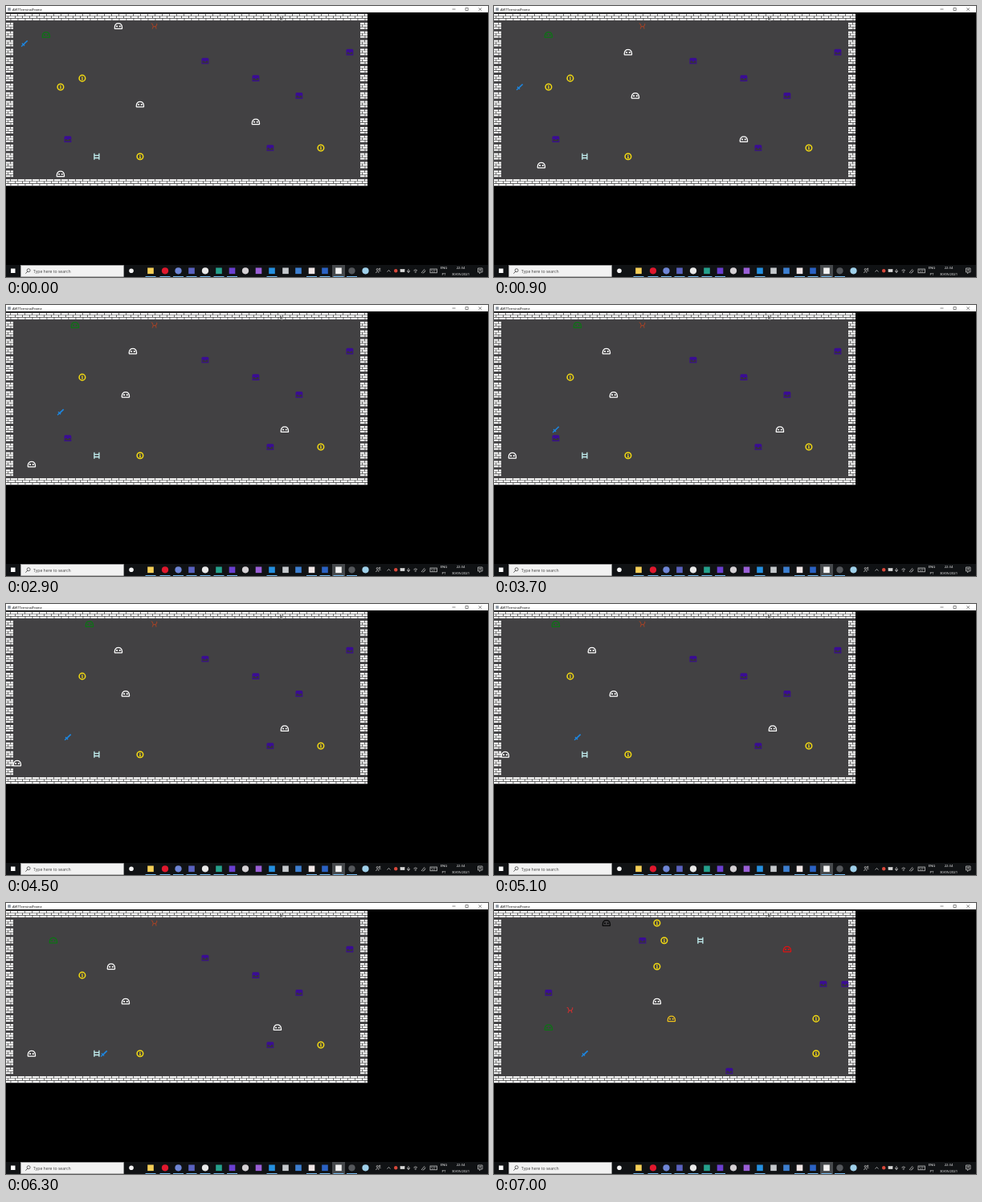
Animation, 600 px wide and 338 px high, one loop 8 s. Source, as an HTML page:

```html
<!DOCTYPE html>
<html lang="en">
<head>
<meta charset="utf-8">
<title>Dungeon</title>
<style>
  html, body { margin: 0; width: 100%; height: 100%; overflow: hidden; background: #000; }
  svg { display: block; width: 600px; height: 338px; }
  .ui { font-family: "Open Sans", "Noto Sans", sans-serif; }
  .mono { font: italic 9px "DejaVu Sans Mono", "Noto Sans Mono", monospace; letter-spacing: 3.6px; white-space: pre; }
</style>
</head>
<body>
<svg viewBox="0 0 600 338" xmlns="http://www.w3.org/2000/svg">
  <defs>
    <pattern id="bricks" width="9" height="10.85" y="9" patternUnits="userSpaceOnUse">
      <rect width="9" height="10.85" fill="#424143"/>
      <rect y=".9" width="9" height="8" fill="#2c2c2c"/>
      <path fill="#fff" d="M0 .9H5V3.1H0zM5.7 .9H9V3.1H5.7zM0 3.8H2.2V6H0zM2.9 3.8H9V6H2.9zM0 6.7H5.6V8.9H0zM6.3 6.7H9V8.9H6.3z"/>
    </pattern>
    <g id="blob">
      <path d="M-4.3 3.2Q-4.8 3.2-4.6 1.6C-4.2-5 4.2-5 4.6 1.6Q4.8 3.2 4.3 3.2Z" fill="none" stroke="currentColor" stroke-width="1.25" stroke-linejoin="round"/>
      <path d="M-2.8-.6H-.9V1.1H-2.8zM.9-.6H2.8V1.1H.9z" fill="currentColor"/>
    </g>
    <g id="imp" fill="none" stroke="currentColor" stroke-width="1.1">
      <path d="M-4.2-3.4L-2.6-2.4L-1.6 .6L-2.8 3.6M-1.6 .6H1.4L2.2 3.6M1.4 .6L2.8-1.4V-3.4"/>
    </g>
    <g id="sword" fill="none" stroke="currentColor">
      <path d="M3.8-3.5L-1.4 1.5" stroke-width="1.7"/>
      <path d="M-2.9-.2L.2 2.8M-1.4 1.5L-3.8 3.7" stroke-width="1.4"/>
    </g>
    <g id="chest">
      <path d="M-4.4-2.2Q-4.4-3.8-3-3.8H3Q4.4-3.8 4.4-2.2V3.8H-4.4Z" fill="currentColor"/>
      <path d="M-3.5-.2H-1.1V1H1.1V-.2H3.5V2.7H-3.5Z" fill="#353338"/>
    </g>
    <g id="coin">
      <circle r="3.8" fill="none" stroke="currentColor" stroke-width="1.5"/>
      <path d="M-.9-2H.6V1.3H1.1V2.1H-1V1.3H-.5V-1.2H-.9Z" fill="currentColor"/>
    </g>
    <g id="ladder" fill="none" stroke="currentColor" stroke-width="1.3">
      <path d="M-3-4V4M3-4V4M-3-1.5H3M-3 1.7H3"/>
    </g>
  </defs>

  <rect width="600" height="338"/>
  <rect y="9" width="450" height="216" fill="url(#bricks)"/>
  <rect x="9" y="18.5" width="432" height="197" fill="#424143"/>
  <g id="world"></g>
  <g id="note" visibility="hidden">
    <rect y="9" height="9.6" fill="#424143"/>
    <text class="mono" y="16.6" fill="#fff"></text>
  </g>
  <path d="M341 12.6V18L342.3 16.8L343.2 18.8L344.1 18.4L343.3 16.5H345Z" fill="#555" stroke="#ddd" stroke-width=".3"/>

  <g class="ui">
    <rect width="600" height="8" fill="#fff"/>
    <rect x="2.2" y="2.2" width="3.6" height="3.6" fill="#8c95a0"/>
    <text x="8" y="5.7" font-size="4.05" fill="#000">AWTTerminalFrame</text>
    <path d="M555.5 4H559.5M572 2.4H575.2V5.6H572ZM588.5 2.3L592 5.8M592 2.3L588.5 5.8" fill="none" stroke="#333" stroke-width=".6"/>

    <rect y="323" width="600" height="15" fill="#101214"/>
    <rect x="6" y="327.5" width="5.5" height="5.5" fill="#fff"/>
    <rect x="18.5" y="323.5" width="128" height="14.2" fill="#f2f2f2" stroke="#b4b4b4" stroke-width=".5"/>
    <path d="M26.8 331.2L24.4 333.6" stroke="#333" stroke-width=".8"/>
    <circle cx="28.1" cy="329.7" r="2" fill="none" stroke="#333" stroke-width=".7"/>
    <text x="34" y="332.5" font-size="5.1" fill="#444">Type here to search</text>
    <g id="apps"></g>
    <g fill="none" stroke="#d8d8d8" stroke-width=".7">
      <path d="M460.5 333Q462.3 328.5 464.2 333M464 331Q465.3 328.5 466.5 331"/>
      <circle cx="462.3" cy="328.6" r="1.1"/><circle cx="465.2" cy="328" r=".8"/>
      <path d="M474.5 331.5L476.5 329.5L478.5 331.5"/>
      <rect x="491" y="328.6" width="5" height="3" fill="#d8d8d8"/>
      <path d="M501 328V333M499.6 330V331.2Q501 333 502.4 331.2V330"/>
      <path d="M507.5 330Q509.8 327.6 512 330M508.6 331.4Q509.8 330.2 511 331.4M509.8 332V333"/>
      <path d="M517 333L521 328.2M518.6 333.2Q521.6 332.6 522 329.6"/>
      <rect x="528" y="328" width="8.5" height="4.8"/>
      <path d="M529.3 329.5H535.4M530.3 331.4H534.3" stroke-dasharray=".8 .5"/>
      <path d="M587.5 327H593V332H591L589.6 333.6V332H587.5ZM588.7 328.6H591.8M588.7 330.2H591.8"/>
    </g>
    <circle cx="485.2" cy="330.3" r="2.2" fill="#d9483b"/>
    <g font-size="4.2" fill="#fff" text-anchor="middle">
      <text x="545" y="328.2">ENG</text><text x="545" y="336">PT</text>
      <text x="566" y="328.2">22:34</text><text x="566" y="336">30/05/2021</text>
    </g>
  </g>
</svg>
<script>
const LOOP = 8000, LEVEL_UP = 6600;
const CELL_W = 9, CELL_H = 10.85;
const NS = "http://www.w3.org/2000/svg";
const world = document.getElementById("world");
const note = document.getElementById("note");
const STEP = { l: [-1, 0], r: [1, 0], u: [0, -1], d: [0, 1] };
const WHITE = "#fff", GREEN = "#0c7414", PURPLE = "#3a0c94", GOLD = "#f3da12", BLUE = "#1d86e0", CYAN = "#c2eef0";

function add(parent, tag, attrs) {
  const el = document.createElementNS(NS, tag);
  for (const k in attrs) el.setAttribute(k, attrs[k]);
  return parent.appendChild(el);
}

const actors = [];

// path: "12r" means one cell to the right at 1.2 s
function actor(shape, color, col, row, path = "", from = 0, to = LEVEL_UP) {
  const el = add(world, "use", { href: "#" + shape, color });
  const moves = path.split(" ").filter(Boolean).map(m => [parseInt(m) * 100, STEP[m.slice(-1)]]);
  actors.push({ el, col, row, moves, from, to });
}

function items(shape, color, cells, from, to) {
  cells.forEach(([c, r]) => actor(shape, color, c, r, "", from, to));
}

// first level
items("chest", PURPLE, [[27, 5], [34, 7], [47, 4], [40, 9], [36, 15]]);
actor("chest", PURPLE, 8, 14, "", 0, 4000);
items("coin", GOLD, [[10, 7], [18, 16], [43, 15]]);
actor("coin", GOLD, 7, 8, "", 0, 1600);
actor("ladder", CYAN, 12, 16);
actor("imp", "#9c4228", 20, 1);
actor("blob", GREEN, 5, 2, "4r 8r 10r 12u 16r 32r 37r 48l 49l 51l 52d 53l 55l 56d");
actor("blob", WHITE, 15, 1, "1d 4r 5r 7d 8r 9d 11u 24l 26d 31l 36l 48l 51l 53d 59r 63d");
actor("blob", WHITE, 18, 10, "4r 7u 10l 12l 16l 52d");
actor("blob", WHITE, 34, 12, "4d 8d 10r 11u 13l 24r 25r 26r 29r 30r 33l 36r 45l 48r 50l 54l");
actor("blob", WHITE, 7, 18, "1l 9u 10l 13l 16l 30l 32l 34r 36u 38d 45l 48u 59r 63r");

// second level
items("chest", PURPLE, [[20, 3], [45, 8], [48, 8], [7, 9], [32, 18]], LEVEL_UP, LOOP);
items("coin", GOLD, [[22, 1], [23, 3], [22, 6], [44, 12], [44, 16]], LEVEL_UP, LOOP);
[["ladder", CYAN, 28, 3], ["imp", "#cc3030", 10, 11], ["blob", GREEN, 7, 13],
 ["blob", "#080808", 15, 1], ["blob", "#e01212", 40, 4], ["blob", WHITE, 22, 10],
 ["blob", "#f0c31a", 24, 12]].forEach(a => actor(...a, "", LEVEL_UP, LOOP));

// hero, present in both
actor("sword", BLUE, 2, 3,
  "1d 4d 5d 7d 8d 9r 10r 11r 12r 16r 24d 26d 29d 31d 33d 36r 40d " +
  "48r 49r 51r 52u 53r 55r 56r 57d 59d 61d 63l 66l", 0, LOOP);

const notes = [
  { from: 1600, to: 2400, text: "Got 114 Coins!" },
  { from: 4000, to: 4500, text: "Got 27 Health Potions!" }
];

// taskbar: x, colour, c = circle or s = square, open = underlined
const apps = document.getElementById("apps");
[[156, "#f4f4f4", "c"], [180, "#f5cf57", "s", 1], [198, "#e0182d", "c", 1], [214.5, "#6f86d6", "c", 1],
 [231, "#5a62c0", "s", 1], [248, "#e8e8e8", "c", 1], [265, "#25a18c", "s", 1], [281.5, "#6a3fd0", "s", 1],
 [298, "#d4d0d4", "c"], [314.5, "#9a5fd6", "s"], [331, "#2590e0", "s", 1], [348, "#c4c8cc", "s"],
 [364, "#3d7fd0", "s"], [380.5, "#f0e6e6", "s", 1], [397, "#2b62c4", "s", 1], [414, "#f2f2f2", "s", 1],
 [430.5, "#55585c", "c", 1], [447.5, "#9fd0ea", "c"]
].forEach(([x, fill, kind, open]) => {
  if (x === 414) add(apps, "rect", { x: 406, y: 323, width: 16, height: 15, fill: "#45484b" });
  if (kind === "c") add(apps, "circle", { cx: x, cy: 330.3, r: x < 160 ? 2.8 : 4.1, fill });
  else add(apps, "rect", { x: x - 3.8, y: 326.5, width: 7.6, height: 7.6, fill });
  if (open) add(apps, "rect", { x: x - 6.5, y: 337, width: 13, height: 1, fill: "#76b9ed" });
});

function showNote(t) {
  const n = notes.find(n => t >= n.from && t < n.to);
  note.setAttribute("visibility", n ? "visible" : "hidden");
  if (!n) return;
  const [box, label] = note.children;
  const x = Math.floor((50 - n.text.length) / 2) * CELL_W;
  box.setAttribute("x", x);
  box.setAttribute("width", n.text.length * CELL_W);
  label.setAttribute("x", x + 1.8);
  label.textContent = n.text;
}

function draw(t) {
  for (const a of actors) {
    const on = t >= a.from && t < a.to;
    a.el.setAttribute("visibility", on ? "visible" : "hidden");
    if (!on) continue;
    let c = a.col, r = a.row;
    for (const [at, [dx, dy]] of a.moves) if (t >= at) { c += dx; r += dy; }
    a.el.setAttribute("transform", `translate(${c * CELL_W + 4.9} ${(r * CELL_H + 14.2).toFixed(2)})`);
  }
  showNote(t);
}

function tick() {
  draw(performance.now() % LOOP);
  requestAnimationFrame(tick);
}
tick();
</script>
</body>
</html>
```
